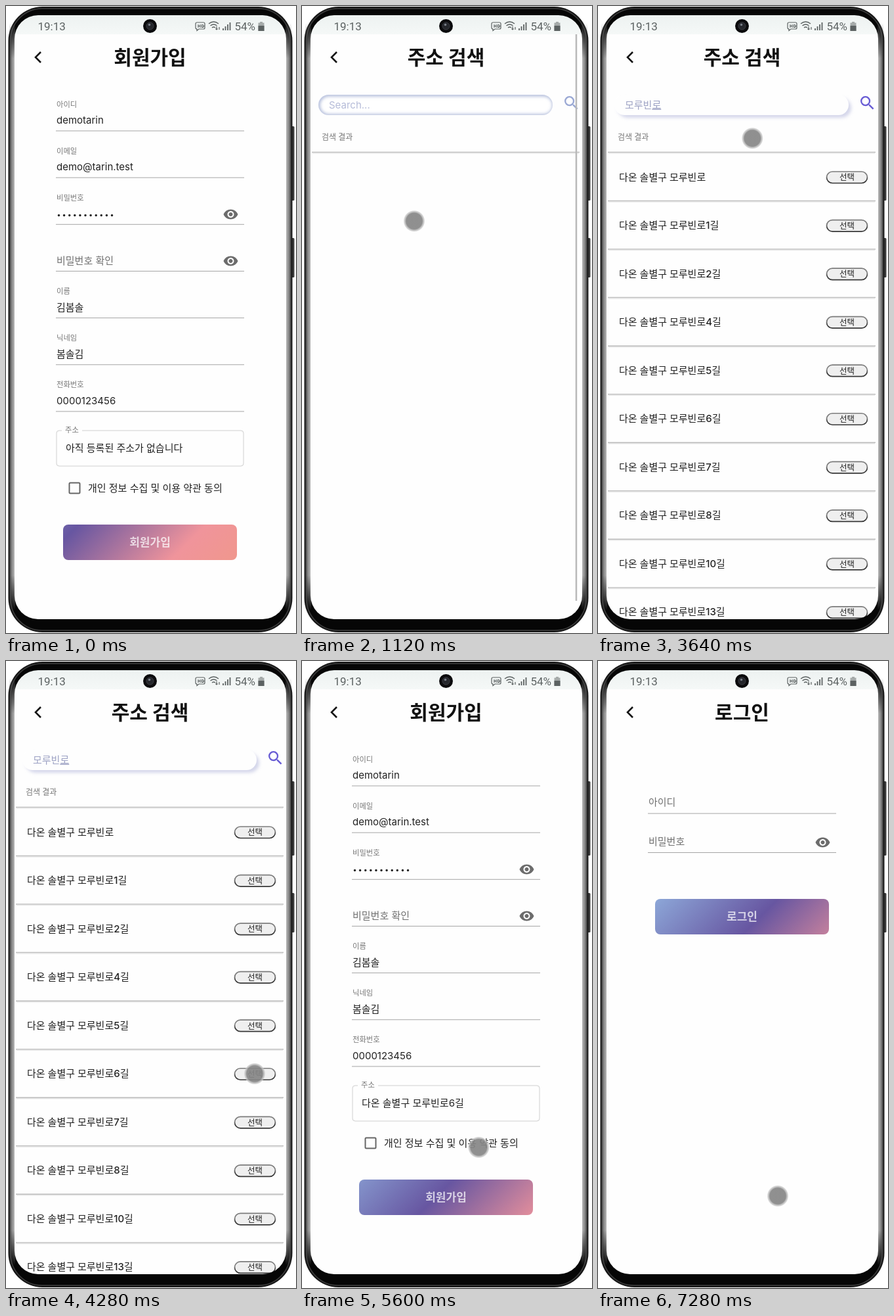
These frames come from a looping animation (442x954 px, 7320 ms). An HTML page:

```html
<!DOCTYPE html>
<html lang="ko">
<head>
<meta charset="utf-8">
<title>회원가입</title>
<style>
  html, body { margin: 0; width: 100%; height: 100%; overflow: hidden; background: #fff; }
  svg { display: block; width: 442px; height: 954px; }
  text { font-family: Inter, "Noto Sans CJK KR", "Noto Sans CJK", sans-serif; font-size: 15px; fill: #222; white-space: pre; }
  .status { font-family: Roboto, sans-serif; font-size: 17px; fill: #5c6262; }
  .title { font-size: 30px; font-weight: 700; fill: #111; text-anchor: middle; }
  .label { font-size: 11.3px; fill: #777; }
  .hint { fill: #707070; }
  .cta { font-size: 17px; font-weight: 700; fill: #fff; fill-opacity: .72; text-anchor: middle; }
  .pick { font-size: 12.5px; text-anchor: middle; }
  .row { font-weight: 500; }
  .section { font-size: 12px; font-weight: 500; fill: #777; }
  .rule { stroke: #a5a5a5; stroke-width: 1; }
</style>
</head>
<body>
<svg viewBox="0 0 442 954" xmlns="http://www.w3.org/2000/svg">
  <defs>
    <clipPath id="screen"><rect x="13" y="14" width="414" height="919" rx="36"/></clipPath>
    <clipPath id="bar"><rect x="25" y="135" width="357" height="31" rx="15.5"/></clipPath>
    <linearGradient id="edge">
      <stop offset="0" stop-color="#2a2a2a"/><stop offset=".35" stop-color="#7d7d7d"/>
      <stop offset="1" stop-color="#c6c6c6"/>
    </linearGradient>
    <linearGradient id="edgeFade" x1="0" y1="0" x2="0" y2="1">
      <stop offset="0" stop-color="#000"/><stop offset=".06" stop-color="#fff"/>
      <stop offset=".94" stop-color="#fff"/><stop offset="1" stop-color="#000"/>
    </linearGradient>
    <mask id="sides"><rect x="0" y="26" width="442" height="894" fill="url(#edgeFade)"/></mask>
    <linearGradient id="statusBg" x1="0" y1="0" x2="0" y2="1">
      <stop offset="0" stop-color="#edf2f1"/><stop offset="1" stop-color="#f5f8f7"/>
    </linearGradient>
    <linearGradient id="bevel" x1="0" y1="0" x2="0" y2="1">
      <stop offset=".4" stop-color="#7c7c7c"/><stop offset=".7" stop-color="#383838"/>
    </linearGradient>
    <linearGradient id="sweep" gradientUnits="userSpaceOnUse" x1="0" y1="0" x2="291.5" y2="291.5">
      <stop offset="0" stop-color="#8eaada"/><stop offset=".333" stop-color="#6756a1"/>
      <stop offset=".667" stop-color="#f0949b"/><stop offset="1" stop-color="#f09a80"/>
    </linearGradient>
    <radialGradient id="touch">
      <stop offset=".74" stop-color="#868686" stop-opacity=".92"/>
      <stop offset=".84" stop-color="#b4b4b4" stop-opacity=".85"/>
      <stop offset=".93" stop-color="#c8c8c8" stop-opacity=".7"/>
      <stop offset="1" stop-color="#d8d8d8" stop-opacity="0"/>
    </radialGradient>
    <filter id="soft" x="-20%" y="-60%" width="140%" height="220%"><feGaussianBlur stdDeviation="2.5"/></filter>
    <path id="eye" fill="#6c6c6c" transform="translate(-12 -12)" d="M12 4.5C7 4.5 2.73 7.61 1 12c1.73 4.39 6 7.5 11 7.5s9.27-3.11 11-7.5c-1.73-4.39-6-7.5-11-7.5zM12 17c-2.76 0-5-2.24-5-5s2.24-5 5-5 5 2.24 5 5-2.24 5-5 5zm0-8c-1.66 0-3 1.34-3 3s1.34 3 3 3 3-1.34 3-3-1.34-3-3-3z"/>
  </defs>

  <g fill="#3a3a3a">
    <rect x="434" y="183" width="5.500" height="113" rx="1.500"/>
    <rect x="434" y="353" width="5.500" height="60" rx="1.500"/>
  </g>
  <rect x="3.500" y="1" width="433" height="952" rx="52" fill="#161616"/>
  <rect x="7" y="4" width="426" height="946" rx="48" fill="#060606" stroke="#3c3c3c" stroke-width="1.500"/>
  <g mask="url(#sides)" fill="url(#edge)">
    <rect x="5" y="20" width="9" height="906"/>
    <rect x="5" y="20" width="9" height="906" transform="translate(440 0) scale(-1 1)"/>
  </g>

  <g clip-path="url(#screen)">
    <rect x="13" y="14" width="414" height="919" fill="#fefefe"/>
    <g id="pages"></g>
    <rect x="13" y="14" width="414" height="29" fill="url(#statusBg)"/>
    <text class="status" x="48.500" y="37">19:13</text>
    <text class="status" x="348.500" y="37">54%</text>
    <g fill="none" stroke="#5c6262" stroke-width="1.2">
      <path d="M291 25h10q2 0 2 2v6q0 2-2 2h-7l-3 2.500v-2.500q-2 0-2-2v-6q0-2 2-2z"/>
      <path d="M293 28v5m0-2.500h3m0-2.500v5m2.500-4.500v4q3 0 3-2t-3-2z"/>
      <path d="M309 27q7.500-6 15 0M311.500 30q5-4 10 0M314 33q2.500-2 5 0" stroke-width="1.500"/>
      <path d="M321 31v5m-1.500-1.500 1.500 1.500 1.500-1.500M325 36v-4"/>
      <path d="M331 37v-3m3.500 3v-6m3.500 6v-9m3.500 9v-12" stroke-width="1.800"/>
    </g>
    <path d="M387 24h4v1.500h2.500v12.500h-9v-12.500h2.500z" fill="#a5aaa9"/>
    <path d="M384.500 30h9v8h-9z" fill="#5c6262"/>
    <circle cx="219.500" cy="30.500" r="10.500" fill="#0b0b0d"/>
    <circle cx="219.500" cy="30.500" r="5.500" fill="#24262b" stroke="#3c3e44"/>
    <circle cx="218.500" cy="28.500" r="1.800" fill="#777c86"/>
    <path d="M53 70l-8 8 8 8" fill="none" stroke="#151515" stroke-width="2.600"/>
    <circle id="pointer" r="16.500" fill="url(#touch)"/>
  </g>
</svg>
<script>
const LOOP = 7320;
const SEARCH_AT = 880, LIST_AT = 3160, RETURN_AT = 4460, CHECK_AT = 6000, LOGIN_AT = 6960;
const CITY = '다온 솔별구 ', STREET = '모루빈로';
const $ = id => document.getElementById(id);

const text = (x, y, s, cls = '') => `<text x="${x}" y="${y}" class="${cls}">${s}</text>`;
const rule = y => `<path class="rule" d="M76 ${y}H363"/>`;
const eye = y => `<use href="#eye" x="342.500" y="${y}"/>`;
const title = s => text(219.5, 88.5, s, 'title');
const button = (y, s) =>
  `<rect x="87" y="${y}" width="265" height="54" rx="8" fill="url(#sweep)"/>` + text(219.5, y + 32.5, s, 'cta');

function formPage() {
  const fields = [['아이디', 'demotarin'], ['이메일', 'demo@tarin.test'], ['비밀번호'], [],
                  ['이름', '김봄솔'], ['닉네임', '봄솔김'], ['전화번호', '0000123456']];
  const rows = fields.map(([label, value], i) => {
    const y = 190 + 71.15 * i;
    return rule(y) + (label ? text(77, y - 36.5, label, 'label') : '') + (value ? text(77, y - 11, value) : '');
  }).join('');
  const dots = Array.from({ length: 11 }, (_, i) => `<circle cx="${80.5 + 8.1 * i}" cy="318.500" r="1.700"/>`).join('');
  return title('회원가입') + rows + `<g fill="#222">${dots}</g>` + eye(317) + eye(388) +
    text(77, 392.5, '비밀번호 확인', 'hint') +
    `<path d="M85 646h-4q-4 0-4 4v46q0 4 4 4h277q4 0 4-4v-46q0-4-4-4H116" fill="none" stroke="#cfcfcf"/>` +
    text(90, 649, '주소', 'label') + `<text id="address" x="91" y="678"></text>` +
    `<rect x="96.500" y="725.500" width="16" height="16" rx="1.500" fill="none" stroke="#666" stroke-width="2"/>
     <g id="check"><rect x="95.500" y="724.500" width="18" height="18" rx="2" fill="#1976d2"/>
     <path d="M99 733.500l4 4 7.500-8" fill="none" stroke="#fff" stroke-width="2"/></g>` +
    text(125, 738.5, '개인 정보 수집 및 이용 약관 동의') + button(789, '회원가입');
}

function searchPage() {
  const divider = y => `<path d="M15 ${y}H423" stroke="#bdbdbd" stroke-width="1.500"/><path d="M16 ${y + 1.5}H422" stroke="#e6e6e6" stroke-width="1.500"/>`;
  const rows = ['', 1, 2, 4, 5, 6, 7, 8, 10, 13].map((n, i) => {
    const y = 260.5 + 73.55 * i;
    return text(32, y + 5, CITY + STREET + (n && n + '길'), 'row') + divider(y + 36) +
      `<rect x="348.500" y="${y - 8.5}" width="62" height="17.500" rx="8.750" fill="#efefef" stroke="url(#bevel)" stroke-width="1.700"/>` +
      text(379.5, y + 4.8, '선택', 'pick');
  }).join('');
  const bar = 'x="25" y="135" width="357" height="31" rx="15.500"';
  return title('주소 검색') +
    `<g id="raised"><rect x="30" y="140" width="356" height="30" rx="15" fill="#b9bcde" fill-opacity=".6" filter="url(#soft)"/><rect ${bar} fill="#fefefe"/></g>
     <g id="sunken" clip-path="url(#bar)"><rect ${bar} fill="#fff"/>
     <rect x="24.500" y="134.500" width="360" height="33" rx="16.500" fill="none" stroke="#a8b4d6" stroke-width="5.500" filter="url(#soft)"/></g>
     <text id="query" x="41" y="155.500"></text><path id="caret" stroke="#7c83b8"/>
     <path id="lens" transform="translate(396.500 133.500) scale(1.170)" d="M15.5 14h-.79l-.28-.27A6.47 6.47 0 0 0 16 9.500 6.500 6.500 0 1 0 9.500 16c1.610 0 3.090-.59 4.230-1.570l.27.28v.79l5 4.990L20.490 19l-4.990-5zm-6 0A4.500 4.500 0 1 1 14 9.500 4.490 4.490 0 0 1 9.500 14z"/>` +
    text(30, 204, '검색 결과', 'section') + divider(222.5) + `<g id="list">${rows}</g>` +
    `<path id="scrollbar" d="M418 43V905" stroke="#b9b9b9" stroke-width="2.500"/>`;
}

function loginPage() {
  return title('로그인') + text(77, 220, '아이디', 'hint') + rule(232) +
    text(77, 279.5, '비밀번호', 'hint') + rule(291.5) + eye(276) + button(362, '로그인');
}

$('pages').innerHTML = `<g id="form">${formPage()}</g><g id="search">${searchPage()}</g><g id="login">${loginPage()}</g>`;

const clamp = v => Math.max(0, Math.min(1, v));
const show = (id, on) => $(id).setAttribute('display', on ? 'inline' : 'none');
const set = (id, name, value) => $(id).setAttribute(name, value);

// CSS "ease": cubic-bezier(.25, .1, .25, 1)
function ease(x) {
  let lo = 0, hi = 1, s = .5;
  for (let i = 0; i < 20; i++) {
    s = (lo + hi) / 2;
    const at = .75 * s * (1 - s) ** 2 + .75 * s * s * (1 - s) + s ** 3;
    if (at < x) lo = s; else hi = s;
  }
  return .3 * s * (1 - s) ** 2 + 3 * s * s * (1 - s) + s ** 3;
}

// time, x, y
const path = [
  [80, 408, 610], [280, 305, 675], [480, 238, 678], [880, 235, 675], [960, 229, 590], [1060, 185, 415],
  [1120, 171, 328], [1280, 168, 205], [1440, 162, 153], [3360, 162, 153], [3640, 235, 200],
  [3920, 325, 550], [4120, 379, 628], [4480, 379, 628], [4640, 406, 636], [5080, 406, 636],
  [5280, 370, 650], [5440, 305, 690], [5600, 270, 740], [5860, 104, 735], [6120, 104, 735],
  [6520, 274, 814], [LOOP, 274, 814]
];
function pointerAt(t) {
  const i = Math.max(1, path.findIndex(p => p[0] > t));
  const [a, b] = [path[i - 1], path[i]];
  const k = clamp((t - a[0]) / (b[0] - a[0]));
  return [a[1] + (b[1] - a[1]) * k, a[2] + (b[2] - a[2]) * k];
}

const strokes = ['ㅁ', '모', '몰', '모루', '모룹', '모루비', '모루빈', '모루빈ㄹ', STREET];
const typedAt = [2120, 2240, 2360, 2480, 2560, 2680, 2800, 2920, 3000];
let lastQuery = null;
function drawSearch(t) {
  const focus = clamp((t - 1640) / 280);
  const typed = strokes[typedAt.filter(at => at <= t).length - 1] || '';
  if (typed !== lastQuery) {
    $('query').innerHTML = typed
      ? `${typed.slice(0, -1)}<tspan text-decoration="underline">${typed.slice(-1)}</tspan>` : 'Search...';
    $('query').style.fill = typed ? '#9da2c4' : '#b5bbd8';
    lastQuery = typed;
  }
  const caretX = 41.5 + (typed ? $('query').getComputedTextLength() : 0);
  set('caret', 'd', `M${caretX} 142V159`);
  show('caret', t > 1900 && t < LIST_AT);
  set('raised', 'opacity', focus);
  set('sunken', 'opacity', 1 - focus);
  const mix = (a, b) => Math.round(a + (b - a) * focus);
  set('lens', 'fill', `rgb(${mix(154, 104)},${mix(168, 92)},${mix(212, 212)})`);
  set('scrollbar', 'opacity', clamp((1480 - t) / 160));
  show('list', t >= LIST_AT);
}

function draw(t) {
  const page = t >= LOGIN_AT ? 'login' : t >= SEARCH_AT && t < RETURN_AT ? 'search' : 'form';
  for (const id of ['form', 'search', 'login']) show(id, id === page);
  if (page === 'search') drawSearch(t);
  else {
    const returned = t >= RETURN_AT;
    const mounted = page === 'login' ? LOGIN_AT : returned ? RETURN_AT : -2800;
    const shift = 265 * ease(clamp((t - mounted) / 7500));
    set('sweep', 'gradientTransform', `translate(${87 - shift} ${page === 'login' ? 362 : 789})`);
    $('address').textContent = returned ? CITY + STREET + '6길' : '아직 등록된 주소가 없습니다';
    show('check', t >= CHECK_AT);
  }
  show('pointer', t >= path[0][0]);
  set('pointer', 'transform', `translate(${pointerAt(t)})`);
}

const start = performance.now();
function tick() {
  draw((performance.now() - start) % LOOP);
  requestAnimationFrame(tick);
}
tick();
</script>
</body>
</html>
```
